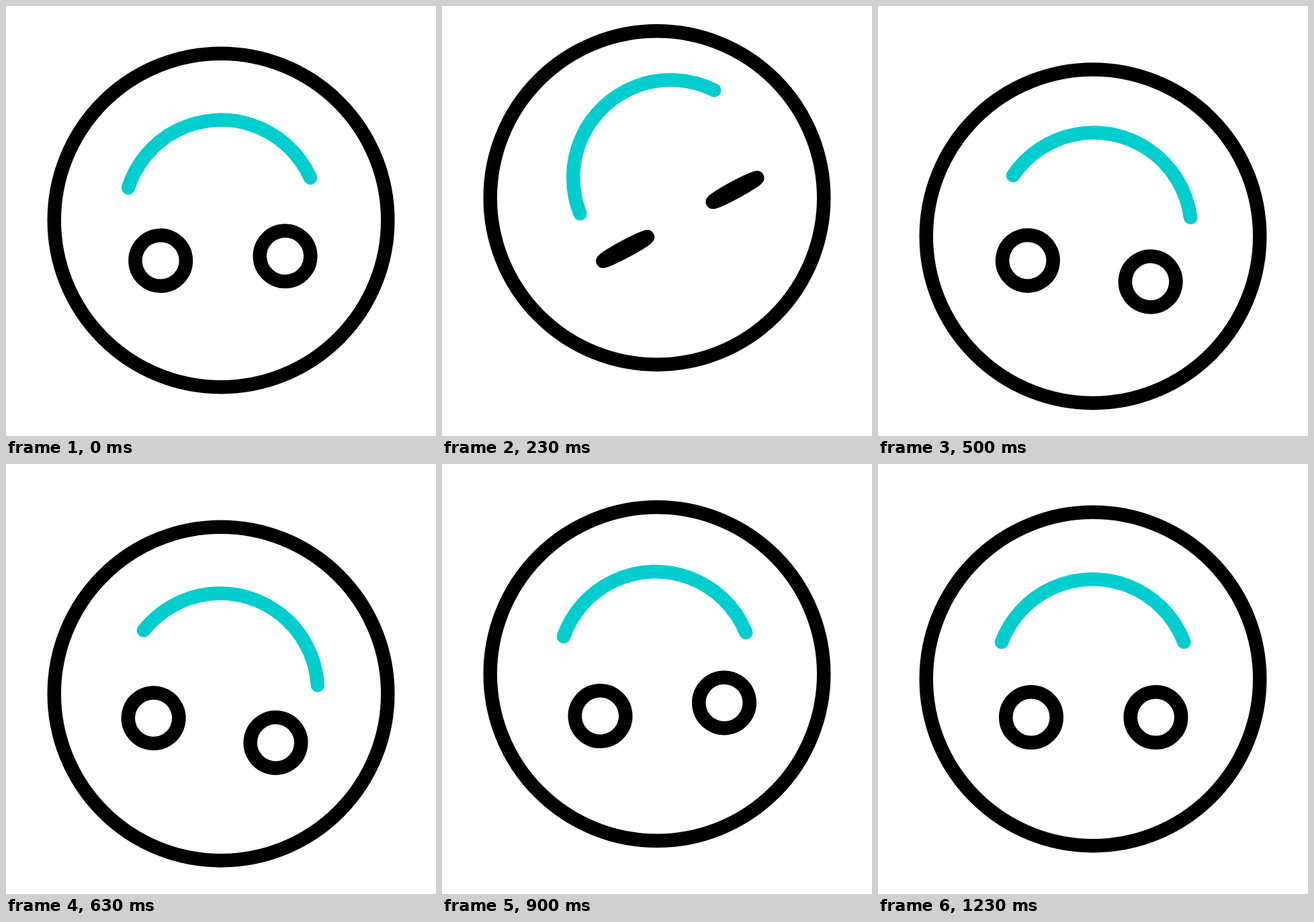
These frames come from a looping animation (640x640 px, 1.67 s). An HTML page with a canvas:

```html
<!DOCTYPE html>
<html lang="en">
<head>
<meta charset="utf-8">
<title>Upside-down face</title>
<style>
  html, body { margin: 0; width: 100%; height: 100%; overflow: hidden; background: #fff; }
  canvas { display: block; width: 640px; height: 640px; }
</style>
</head>
<body>
<canvas id="stage" width="640" height="640"></canvas>
<script>
const ctx = document.getElementById('stage').getContext('2d');
const LOOP = 1670;
const STEP = 100 / 3;
const LAST_STEP = 37;
const INK = '#000';
const TEAL = '#00cdce';

const radians = degrees => degrees * Math.PI / 180;
const clamp = u => Math.min(1, Math.max(0, u));
const ease = u => u * u * (3 - 2 * u);

// Eases from rest to each [step, value] turning point in turn.
function swing([startStep, startValue], ...turns) {
  return step => {
    let from = startStep, value = startValue;
    for (const [to, next] of turns) {
      value += (next - value) * ease(clamp((step - from) / (to - from)));
      from = to;
    }
    return value;
  };
}

// Wind up, hold, overshoot, then two smaller swings back to rest.
const wobble = (windUp, overshoot, back, settle) =>
  swing([-1, 0], [5, windUp], [8, windUp], [17, overshoot], [25, back], [31, settle], [37, 0]);

const faceY = swing([-1, 320], [9, 281.5], [10, 281.5], [16.8, 355.5], [23.3, 304.5], [30.5, 320]);
const eyeOpen = swing([3, 1], [7, 0.08], [11, 1]);

const mouth = {
  angle: wobble(-42.6, 21.4, -3.5, 5.1),
  x: swing([-1, 0], [8.5, 24.5], [15.7, 0], [23, -4.4], [31, 0.7], [37, 0]),
  y: swing([-1, 0], [8.5, -30], [17.5, 0], [23, -5.2], [35, 0])
};
const eyes = {
  angle: wobble(-28.3, 15.3, -9.8, 4.6),
  x: swing([0, 0], [11, 9.6], [17, 1], [31, 1], [37, 0]),
  y: swing([-0.5, 0], [10, -22], [17, 0], [23, -5.3], [35, 0])
};

function strokeEllipse(x, y, rx, ry, color, from = 0, to = 2 * Math.PI) {
  ctx.strokeStyle = color;
  ctx.beginPath();
  ctx.ellipse(x, y, rx, ry, 0, from, to);
  ctx.stroke();
}

function withPose(part, step, drawPart) {
  ctx.save();
  ctx.translate(part.x(step), part.y(step));
  ctx.rotate(radians(part.angle(step)));
  drawPart();
  ctx.restore();
}

function draw(step) {
  ctx.fillStyle = '#fff';
  ctx.fillRect(0, 0, 640, 640);
  ctx.lineWidth = 20.5;
  ctx.lineCap = 'round';
  ctx.save();
  ctx.translate(320, faceY(step));
  strokeEllipse(0, 0, 248.25, 248.25, INK);
  withPose(mouth, step, () => {
    const tip = radians(20.86);
    strokeEllipse(-0.3, -3.3, 145.2, 145.2, TEAL, Math.PI + tip, 2 * Math.PI - tip);
  });
  withPose(eyes, step, () => {
    for (const side of [-1, 1]) {
      strokeEllipse(0.75 + side * 92.75, 57, 37.75, 37.75 * eyeOpen(step), INK);
    }
  });
  ctx.restore();
}

// The motion advances in 30 steps a second, rounded to 10 ms, then rests.
function render() {
  const time = Math.floor(performance.now() % LOOP / 10) * 10;
  draw(Math.min(LAST_STEP, Math.floor((time + 4) / STEP)));
  requestAnimationFrame(render);
}
render();
</script>
</body>
</html>
```
